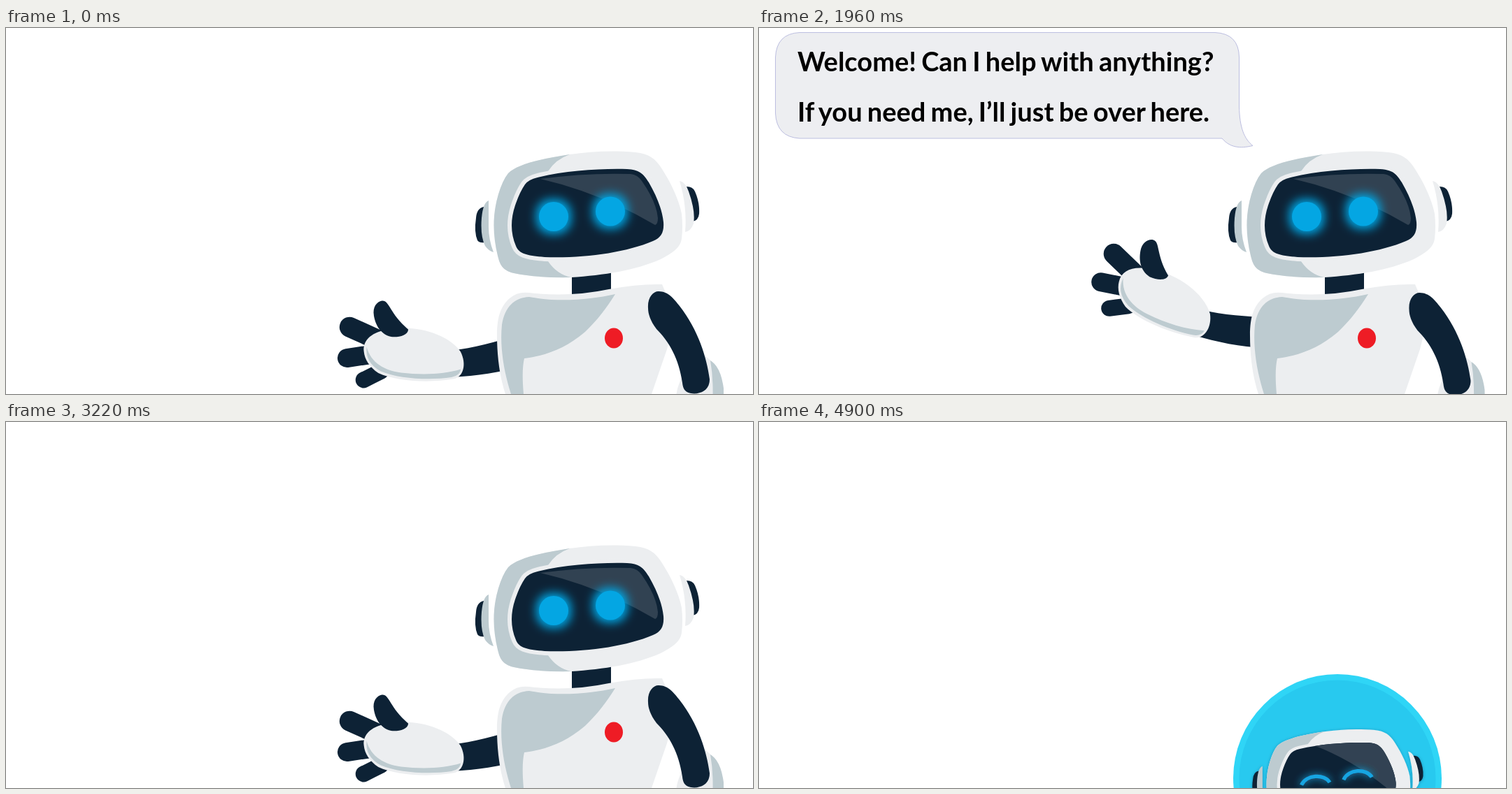
These frames come from a looping animation (1068 by 524 pixels, 5810 ms). An HTML page:

```html
<!DOCTYPE html>
<html lang="en">
<head>
<meta charset="utf-8">
<title>Robot assistant</title>
<style>
  html, body { margin: 0; width: 100%; height: 100%; overflow: hidden; background: #fff; }
  svg { display: block; width: 1068px; height: 524px; }
  text { font: 700 38px Lato, sans-serif; word-spacing: -2px; }
  .light { fill: #eceef0; }
  .shade { fill: #bdcbd0; }
  .dark { fill: #0d2235; }
  .eye { fill: #04a6e3; }
  .finger { stroke: #0d2235; stroke-linecap: round; }
  .arch { fill: none; stroke: #17a5e2; }
</style>
</head>
<body>
<svg id="stage" viewBox="0 0 1068 524"></svg>
<script>
const LOOP = 5810, STEP = 70;
const stage = document.getElementById('stage');

const HEAD = 'M806 181C835 177 865 175 900 178C919 180 929 187 938 202C952 224 962 246 966 266Q968 284 966 302C964 315 953 322 936 331C900 347 855 354 808 357Q760 358 726 351C709 347 706 338 703 326C696 297 695 268 704 238Q710 218 718 208C730 196 760 188 806 181Z';
const VISOR = 'M760 214C800 204 850 201 888 202C905 203 911 208 919 221C931 242 938 260 940 278C941 292 937 300 925 305C885 322 825 330 770 328C742 326 733 322 729 312C721 293 721 273 729 251Q735 234 742 224Q747 217 760 214Z';

const glowing = shape => `<g filter="url(#glow)">${shape}</g>${shape}`;
const circle = (x, y, r, id = '') => `<circle ${id && `id="${id}"`} class="eye" cx="${x}" cy="${y}" r="${r}"/>`;
const arch = (d, width) => `<path class="arch" stroke-width="${width}" d="${d}"/>`;

const head = (eyes, glare) => `
  <path class="dark" d="M683 256Q673 258 672 272Q669 292 674 304Q677 308 684 307Z"/>
  <path class="shade" d="M690 247Q682 250 680 272Q678 298 685 312Q690 319 697 321Q690 303 690 285Z"/>
  <path class="dark" d="M973 227Q982 227 985 234Q992 250 991 266Q990 276 981 277Z"/>
  <path class="light" d="M963 219Q971 220 976 234Q986 262 983 280Q979 291 971 292Q974 255 963 219Z"/>
  <path class="light" d="${HEAD}"/>
  <path class="shade" clip-path="url(#headClip)" d="M690 170H830L806 181Q786 188 775 205L750 270L775 334Q788 353 808 357L800 370H690Z"/>
  <path d="${VISOR}" fill="#eceef0" stroke="#eceef0" stroke-width="12"/>
  <path class="dark" d="${VISOR}"/>
  <path clip-path="url(#visorClip)" fill="#314252" d="${glare}"/>
  ${eyes}`;

const openEyes = `
  <g filter="url(#halo)">${circle(783, 270, 21)}</g>${circle(783, 270, 21, 'leftEye')}
  <g id="rightEye"><g filter="url(#halo)">${circle(864, 262.5, 21)}</g>${circle(864, 262.5, 21)}</g>
  <path id="wink" fill="#17a5e2" d="M832 274C836 243 886 238 896 267L887 268C876 253 850 254 842 273Z"/>`;
const smilingEyes = glowing(
  arch('M763 283C772 263 806 261 816 278', 7) + arch('M842 273C851 252 885 251 895 268', 7));

const arm = `
  <path class="dark" d="M625 422C660 425 690 421 724 417V461C690 466 655 464 622 460Z"/>
  <path class="finger" stroke-width="29" d="M489 364L524 388"/>
  <path class="finger" stroke-width="27" d="M477.500 407L512 408"/>
  <path class="finger" stroke-width="23" d="M495.500 442L522 434"/>
  <path class="light" d="M503 402C504 385 520 376 545 377C585 377 627 400 639 426C645 445 637 463 622 463C588 463 540 452 518 436C507 425 502 413 503 402Z"/>
  <path class="shade" d="M508 396C510 420 528 434 550 441C580 450 610 454 635 451Q632 460 620 460C588 459 545 449 522 434C508 423 504 410 508 396Z"/>
  <path class="dark" d="M526 354C526 341 534 335 541 335C552 336 548 354 571 382C569 390 556 391 545 388C530 381 526 367 526 354Z"/>`;

const sideArm = `
  <path class="light" d="M957 540Q958 505 975 490L1000 470Q1022 485 1026 520V540Z"/>
  <path class="shade" d="M1007 476Q1022 485 1026 516V540H1010Q1012 505 1007 476Z"/>
  <path class="dark" d="M918 401C917 386 925 377 933 377C947 377 955 388 963 398C990 433 1002 472 1006 503C1006 517 996 523 984 523.500C970 523 968 516 967 508C962 473 948 449 930 431C921 419 918 409 918 401Z"/>`;

const body = `
  <path class="dark" d="M809 350H865V376L809 384Z"/>
  <path class="light" d="M702 440C702 412 708 398 720 387Q731 377 748 379Q805 386 862 374Q905 366 938 367L950 395V440L945 460L923 524H714C706 500 702 470 702 440Z"/>
  <path class="shade" d="M748 385C790 393 835 389 871 381C860 399 845 419 828 435C800 459 772 469 741 473Q737 490 740 524H722C711 490 706 455 709 425C713 399 727 386 748 385Z"/>
  <ellipse cx="869" cy="444" rx="13" ry="14.500" fill="#ee1c25"/>`;

stage.innerHTML = `
  <defs>
    <filter id="glow" x="-100%" y="-100%" width="300%" height="300%"><feGaussianBlur stdDeviation="7"/></filter>
    <filter id="halo" x="-100%" y="-100%" width="300%" height="300%">
      <feMorphology operator="dilate" radius="4"/><feGaussianBlur stdDeviation="7"/>
    </filter>
    <filter id="soft"><feDropShadow dx="0" dy="1" stdDeviation="3" flood-color="#0d2235" flood-opacity=".3"/></filter>
    <clipPath id="headClip"><path d="${HEAD}"/></clipPath>
    <clipPath id="visorClip"><path d="${VISOR}"/></clipPath>
  </defs>
  <g id="robot">
    <g id="arm">${arm}</g>
    ${body}
    <g id="sideArm">${sideArm}</g>
    ${head(openEyes, 'M764 216Q830 207 893 209Q903 210 909 219Q930 249 932 272Q932 281 928 282Q850 236 764 216Z')}
  </g>
  <g id="bubble">
    <path id="bubbleShape" stroke-width="1" d="M58 6.500H652Q686 8 686.500 42V112C687 143 694 159 706 168.500C687 173 673 171 662 158H58Q25 156 23.500 122V42Q25 8 58 6.500Z"/>
    <text x="55" y="62">Welcome! Can I help with anything?</text>
    <text x="55" y="134">If you need me, I’ll just be over here.</text>
  </g>
  <g id="badge">
    <circle r="149" fill="#2fd5f6"/>
    <circle r="140.500" fill="#28c9ef"/>
    <g filter="url(#soft)" transform="matrix(.7627 0 0 .7497 -633.4 -202.4)">
      ${head(smilingEyes, 'M788 200H945V305L934 298Q865 238 788 208Z')}
    </g>
  </g>`;

const el = {};
stage.querySelectorAll('[id]').forEach(node => el[node.id] = node);
const show = (node, on) => node.setAttribute('display', on ? 'inline' : 'none');
const place = (node, transform) => node.setAttribute('transform', transform);

// Smooth curve through [time, value] points, level at every turning point.
function curve(points) {
  const slope = i => {
    const a = points[i - 1], b = points[i], c = points[i + 1];
    if (!a || !c || (b[1] - a[1]) * (c[1] - b[1]) <= 0) return 0;
    return (c[1] - a[1]) / (c[0] - a[0]);
  };
  return t => {
    if (t <= points[0][0]) return points[0][1];
    const i = points.findIndex(p => p[0] > t) - 1;
    if (i < 0) return points[points.length - 1][1];
    const [t0, v0] = points[i], [t1, v1] = points[i + 1];
    const d = t1 - t0, u = (t - t0) / d, w = 1 - u;
    return v0 * (1 + 2 * u) * w * w + v1 * u * u * (3 - 2 * u)
      + d * u * w * (slope(i) * w - slope(i + 1) * u);
  };
}

const armAngle = curve([[490, -10], [700, 0], [1120, 10], [1330, 16], [1645, 28], [1960, 9.5],
  [2120, 1], [2520, 27], [2870, 0], [3220, -10]]);
const sideX = curve([[490, 0], [700, 10], [1330, 11.5], [2380, 11.5], [2870, 10], [3220, 0]]);
const sideY = curve([[490, 0], [700, 5], [1330, 2], [2380, 2], [2870, 5], [3220, 0]]);
const bubbleSize = curve([[490, 0], [560, 0.38], [630, 0.68], [700, 0.904], [770, 1],
  [3010, 1], [3220, 0]]);
const badgeLeft = curve([[3500, 499], [3780, 524], [4060, 568], [4620, 663], [4690, 673],
  [4760, 677], [4900, 678]]);

function drawRobot(t) {
  const angle = armAngle(t);
  place(el.arm, `rotate(${angle} ${angle < 0 ? '857 383' : '743 453'})`);
  place(el.sideArm, `translate(${sideX(t)} ${sideY(t)})`);
  const winking = t >= 1260 && t < 1680;
  show(el.wink, winking);
  show(el.rightEye, !winking);
  el.leftEye.setAttribute('r', winking ? 19 : 21);
}

function drawBubble(t) {
  const size = bubbleSize(t);
  const tone = (r, g, b) => `rgb(${[r, g, b].map(c => Math.round(c * size))})`;
  show(el.bubble, size > 0.01);
  place(el.bubble, `translate(803 238) scale(${size}) translate(-803 -238)`);
  el.bubbleShape.setAttribute('fill', tone(237, 238, 241));
  el.bubbleShape.setAttribute('stroke', tone(188, 190, 224));
}

function drawBadge(t) {
  const left = badgeLeft(t), right = 976, p = (left - 524) / 154;
  const top = 212 + 149 * p, bottom = 698 - 39 * p;
  place(el.badge, `translate(${(left + right) / 2} ${(top + bottom) / 2})
    scale(${(right - left) / 298} ${(bottom - top) / 298})`);
}

function draw(time) {
  const t = Math.floor(time % LOOP / STEP) * STEP;
  const small = t >= 3500;
  show(el.robot, !small);
  show(el.badge, small);
  drawBubble(t);
  if (small) drawBadge(t); else drawRobot(t);
}

const start = performance.now();
function tick() {
  draw(performance.now() - start);
  requestAnimationFrame(tick);
}
tick();
</script>
</body>
</html>
```
